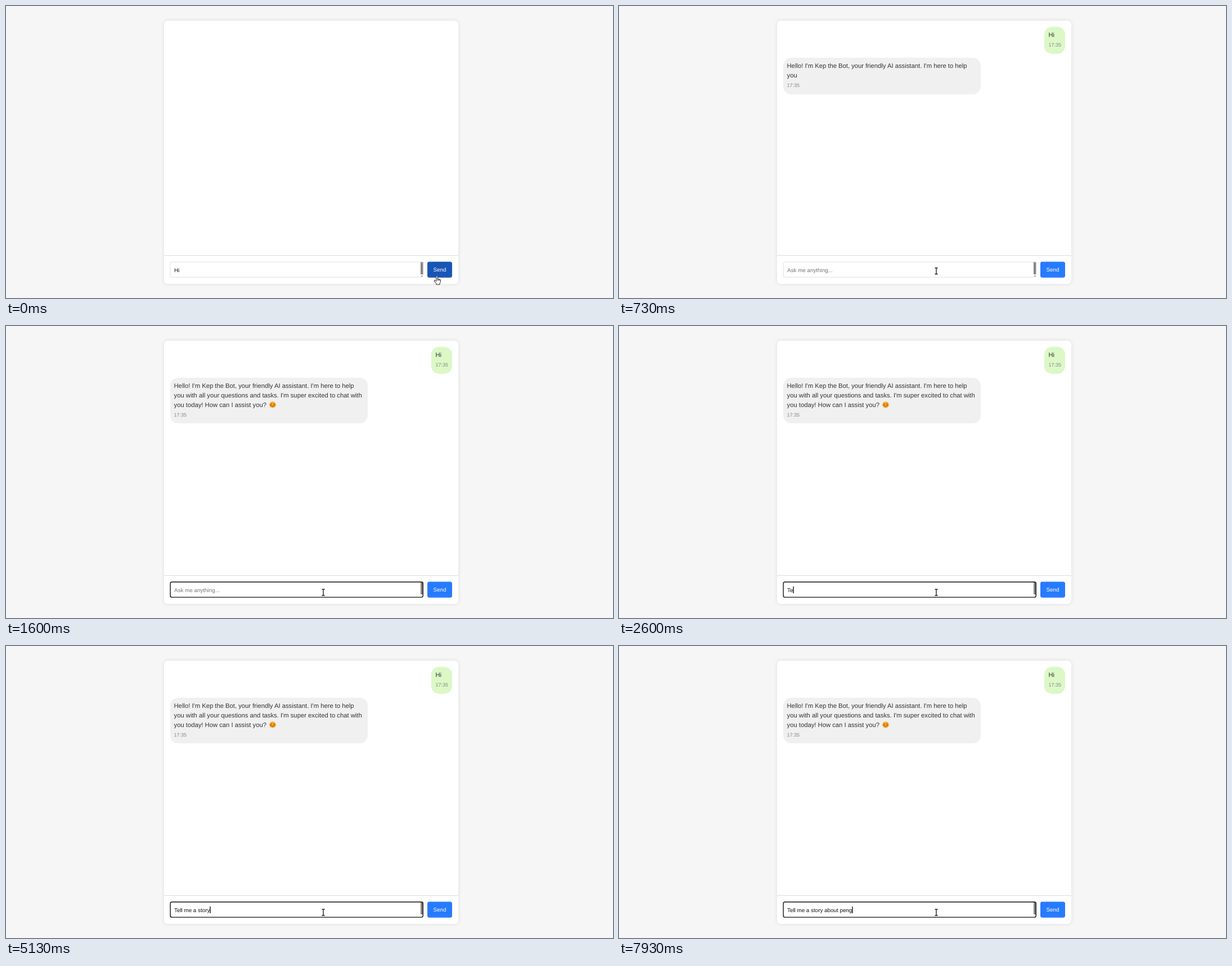
An HTML page that plays this animation: 1079 px wide and 519 px high, repeating every 8000 ms.

```html
<!DOCTYPE html>
<html lang="en">
<head>
<meta charset="utf-8">
<title>Chat</title>
<style>
  html, body { margin: 0; width: 100%; height: 100%; overflow: hidden; background: #f6f6f6; }
  body { position: relative; font: 11.25px/16.9px "Liberation Sans", Arial, sans-serif; color: #333; text-rendering: geometricPrecision; }
  .wrap { position: absolute; left: 0; top: 0; width: 1079px; height: 519px; overflow: hidden; }
  .card { position: absolute; left: 281px; top: 26px; width: 523px; height: 468px; border-radius: 7px; background: #fff; box-shadow: 0 0 7px rgba(0, 0, 0, .1); }
  .msg { position: absolute; box-sizing: border-box; max-width: 351.4px; padding: 7px; border-radius: 14px; }
  .user { top: 37px; right: 286.1px; background: #dcf8c6; }
  .bot { top: 91.8px; left: 291.5px; width: max-content; background: #f0f0f0; }
  small { font-size: 9px; color: #888; }
  .smile { width: 12px; height: 12px; margin-left: 2px; vertical-align: -2.4px; }
  .stage { position: absolute; left: 0; top: 0; }
  .stage text { font-size: 9.84px; white-space: pre; }
</style>
</head>
<body>
<div class="wrap">
  <div class="card"></div>
  <div class="msg user" id="user">Hi<br><small>17:35</small></div>
  <div class="msg bot" id="bot"><span id="reply"></span><svg class="smile" id="smile" viewBox="0 0 12 12">
    <circle cx="6" cy="6" r="5.8" fill="#fbad26"/>
    <g fill="#f4702f"><circle cx="2.4" cy="6.7" r="1.5"/><circle cx="9.6" cy="6.7" r="1.5"/></g>
    <path d="M2.5 4.9q1.2-1.6 2.4 0M7.1 4.9q1.2-1.6 2.4 0M3.4 7.6q2.6 2.8 5.2 0" fill="none" stroke="#4f3426" stroke-width=".9" stroke-linecap="round"/>
  </svg><br><small>17:35</small></div>

  <svg class="stage" width="1079" height="519" viewBox="0 0 1079 519">
    <path d="M281 443.5H804" stroke="#dedede"/>
    <rect x="737" y="455" width="4.6" height="22" rx=".6" fill="#858585"/>
    <rect id="grip" x="738.6" y="479.4" width="1.4" height="1.4" fill="#222"/>
    <rect id="frame" x="292.1" y="455" width="449.1" height="27.1" rx="2.8" fill="none"/>
    <text id="field" x="299" y="472.6"></text>
    <rect id="caret" y="463" width="1.3" height="12" fill="#000"/>
    <rect id="button" x="749" y="454.4" width="44" height="28.4" rx="3.5"/>
    <text x="771" y="471.8" text-anchor="middle" fill="#fff">Send</text>
    <g id="pointer" stroke-linejoin="round">
      <path id="arrow" d="M.5 .5V12.2l2.7-2.4 1.9 4.2 1.9-.8-1.9-4.2H8.3Z" fill="#fff" stroke="#222"/>
      <path id="beam" d="M-2.5-5.5h1.8L0-5l.7-.5h1.8M0-5V5M-2.5 5.5h1.8L0 5l.7.5h1.8" fill="none" stroke="#111" stroke-width="1.3"/>
      <path id="hand" d="M-1.2 9V1Q-1.2-.2 0-.2T1.2 1V6Q2.5 5.2 3.2 6.5 4.5 5.9 5 7.1 6.2 6.8 6.3 8V11.5L5 14V16H-1.2V14.2L-4.8 10Q-5.4 8.6-4 8.4-3 8.4-1.2 10.4ZM1.2 6V9M3.2 6.6V9M5 7.2V9" fill="#fff" stroke="#222"/>
    </g>
  </svg>
</div>
<script>
const LOOP = 8000;
const $ = id => document.getElementById(id);
const show = (id, on) => { $(id).style.display = on ? "" : "none"; };
// Value of the last [time, value] step reached at t.
const at = (steps, t) => steps.reduce((v, s) => t >= s[0] ? s[1] : v, null);

const words = ("Hello! I'm Kep the Bot, your friendly AI assistant. I'm here to help " +
  "you with all your questions and tasks. I'm super excited to chat with " +
  "you today! How can I assist you? ").split(" ");
const wordCount = [[530, 1], [600, 4], [670, 9], [730, 14], [800, 20], [870, 27], [930, words.length]];

const prompt = "Tell me a story about peng";
const keyTimes = [2400, 2600, 2870, 3000, 3200, 3400, 3470, 3530, 3730, 3800, 4470, 4730, 4930,
  4930, 5130, 5400, 5670, 5800, 6000, 6130, 6270, 6530, 7330, 7470, 7600, 7930];
const caretOn = [[0, false], [1070, true], [1600, false], [2130, true], [4400, false],
  [4470, true], [7070, false], [7330, true]];

const pointer = [
  [0, ["hand", 766, 479]], [470, ["arrow", 700, 450]], [530, ["arrow", 589, 446.5]],
  [600, ["arrow", 568, 450]], [670, ["beam", 563, 465]], [730, ["beam", 564, 471]],
  [800, ["beam", 564, 473.5]]
];

function drawReply(t) {
  const n = at(wordCount, t) || 0, done = n === words.length;
  show("bot", n > 0);
  show("smile", done);
  const text = n === 1 ? "Hello" : words.slice(0, n).join(" ");
  if ($("reply").textContent !== text) $("reply").textContent = text;
}

function drawField(t) {
  const typed = t < 130 ? "Hi" : prompt.slice(0, keyTimes.filter(k => k <= t).length);
  const field = $("field"), focus = t >= 1070;
  field.textContent = typed || "Ask me anything...";
  field.setAttribute("fill", typed ? "#111" : "#757575");
  const end = typed ? field.getComputedTextLength() : 0;
  $("caret").setAttribute("x", 299 + end);
  show("caret", at(caretOn, t));
  show("grip", !focus);
  $("frame").setAttribute("stroke", focus ? "#111" : "#d2d2d2");
  $("frame").setAttribute("stroke-width", focus ? 1.4 : .7);
}

function drawPointer(t) {
  const [kind, x, y] = at(pointer, t);
  for (const id of ["arrow", "beam", "hand"]) show(id, id === kind);
  $("pointer").setAttribute("transform", `translate(${x} ${y})`);
  $("button").setAttribute("fill", kind === "hand" ? "#1856b6" : "#277bff");
}

const start = performance.now();
function draw() {
  const t = (performance.now() - start) % LOOP;
  show("user", t >= 130);
  drawReply(t);
  drawField(t);
  drawPointer(t);
  requestAnimationFrame(draw);
}
draw();
</script>
</body>
</html>
```
